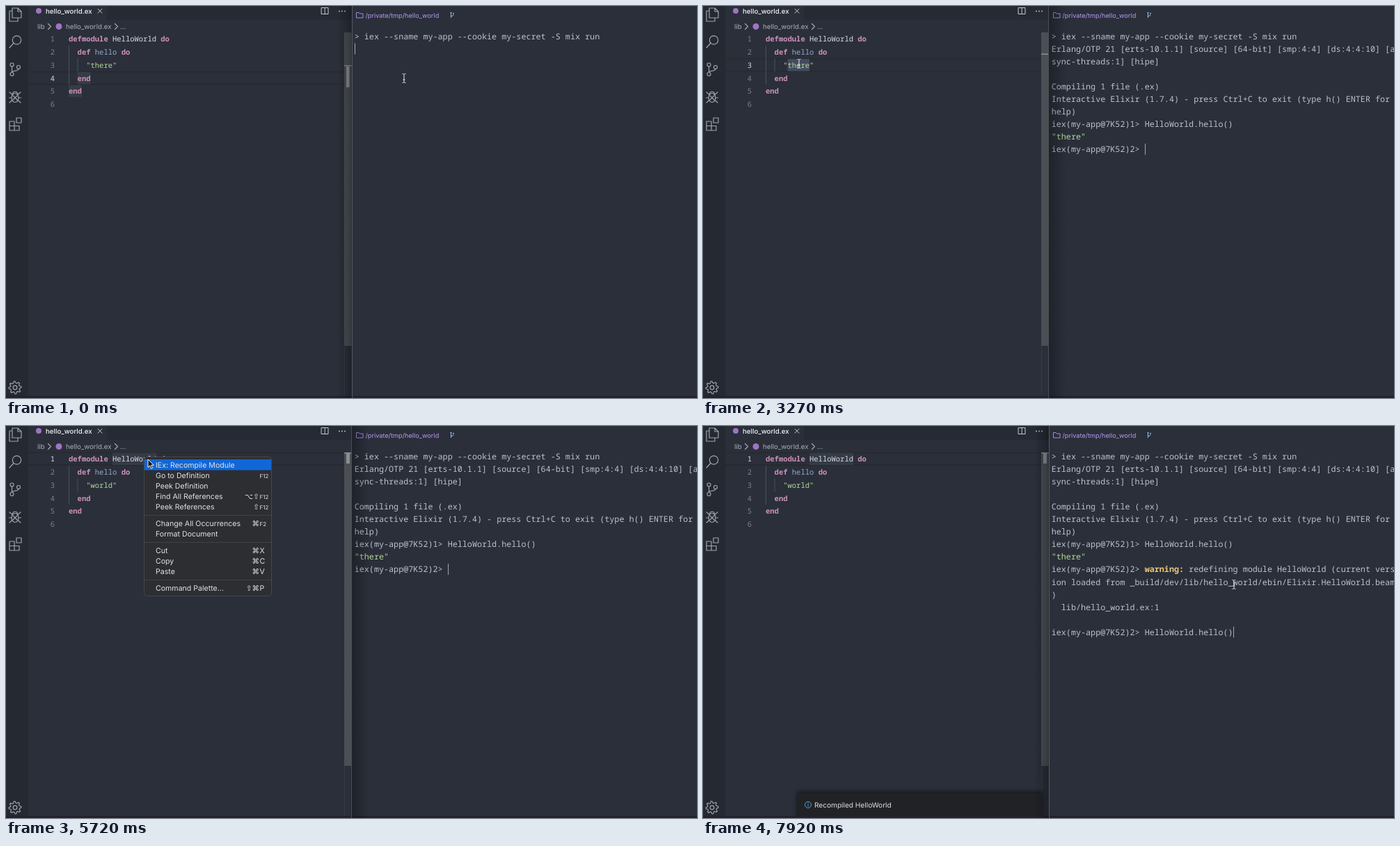
An HTML page that plays this animation: 993x564 px, repeating every 8000 ms.

```html
<!DOCTYPE html>
<html lang="en">
<head>
<meta charset="utf-8">
<title>Recompile module from the editor</title>
<style>
html, body { margin: 0; width: 100%; height: 100%; overflow: hidden; background: #2a2f3a; }
svg { display: block; width: 993px; height: 564px; }
text { white-space: pre; text-rendering: geometricPrecision; }
.ui { font-family: Inter, "Open Sans", sans-serif; }
.code, .term { font-family: "Noto Sans Mono", "DejaVu Sans Mono", monospace; }
.code { font-size: 10.5px; fill: #d8dee9; }
.term { font-size: 11.76px; fill: #bbc2cd; }
.key { fill: #cf92ba; font-weight: 700; }
.fn { fill: #94abc7; }
.str { fill: #b2d898; }
.warn { fill: #f0c674; font-weight: 700; }
.num { fill: #7a818d; text-anchor: end; }
.now { fill: #d8dce3; text-anchor: end; }
.dim { fill: #adadad; }
.side { fill: #b4c2cf; }
.icon { fill: none; stroke: #a0a5ae; stroke-width: 1.2; stroke-linejoin: round; stroke-linecap: round; }
.lite { stroke: #c5c9d0; stroke-width: 1; }
.item { font-size: 10.6px; fill: #e2e2e4; }
.small { font-size: 8px; }
.mod { font-family: "DejaVu Sans", sans-serif; font-size: 10.5px; fill: #e2e2e4; text-anchor: end; }
</style>
</head>
<body>
<svg viewBox="0 0 993 564">
  <defs>
    <linearGradient id="toLeft"><stop offset="0" stop-opacity="0"/><stop offset="1" stop-opacity=".28"/></linearGradient>
    <linearGradient id="toRight"><stop offset="0" stop-opacity=".28"/><stop offset="1" stop-opacity="0"/></linearGradient>
    <filter id="soft" x="-10%" y="-30%" width="120%" height="160%"><feGaussianBlur stdDeviation="3"/></filter>
  </defs>

  <rect width="993" height="564" fill="#2a2f3a"/>
  <rect width="32" height="564" fill="#252931"/>
  <rect x="145" width="352" height="20" fill="#252a33"/>

  <g class="icon">
    <path d="M9 3h8l5 5v9H9zM17 3v5h5M9 7H5v15h12v-5"/>
    <circle cx="15.5" cy="49" r="6.2"/><path d="M11 53.5 5 60"/>
    <circle cx="8.5" cy="84.5" r="2.5"/><circle cx="8.5" cy="98" r="2.5"/><circle cx="18" cy="88" r="2.5"/>
    <path d="M8.5 87v8.5M18 90.5c0 4-9.5 2-9.5 5"/>
    <ellipse cx="13" cy="132" rx="5" ry="6.5"/>
    <path d="M9.5 127c0-5 7-5 7 0M5 124l3.5 3M21 124l-3.5 3M4.5 132H8M18 132h3.5M5 139l3.5-3M21 139l-3.5-3M10 129l6 6M16 129l-6 6"/>
    <path d="M5 166h7v13H5zM5 172.5h14V179H5M15 161h7v7h-7z"/>
    <circle cx="13" cy="549" r="2.8"/>
    <path id="gear"/>
  </g>

  <g class="ui">
    <circle cx="47" cy="7" r="4" fill="#a074c4"/>
    <text x="57" y="10.6" font-size="9.7" font-weight="500" fill="#f4f6fa">hello_world.ex</text>
    <path class="icon lite" d="M132 4.2l6 6M138 4.2l-6 6" data-on="0-3960 4660-8000"/>
    <circle cx="135" cy="7.2" r="3.3" fill="#c5c9d0" data-on="3960-4660"/>
    <path class="icon lite" d="M453.5 2.500h9.500v9h-9.500zM458.2 2.500v9"/>
    <g fill="#c5c9d0"><circle cx="479" cy="7.5" r=".9"/><circle cx="483" cy="7.5" r=".9"/><circle cx="487" cy="7.5" r=".9"/></g>
    <g font-size="9.7" fill="#aab0ba">
      <text x="45" y="32.8">lib</text>
      <text x="86" y="32.8">hello_world.ex</text>
      <text x="164" y="32.8">...</text>
    </g>
    <path class="icon" d="M60.5 25.5l4 4-4 4M156.500 25.5l4 4-4 4"/>
    <circle cx="76" cy="29.5" r="4.5" fill="#a074c4"/>
  </g>

  <g id="editor"></g>
  <rect x="486" y="38" width="1" height="523" fill="#353a44"/>
  <rect x="486" y="38" width="10.5" height="451" fill="#4b4f54"/>
  <g fill="#8a8e94">
    <path d="M486 85h10.5v1.6H486zM489 87h4.5v30H489z" data-on="0-3160"/>
    <path d="M486 68.5h10.5v1.6H486z" data-on="3160-5140"/>
    <path d="M486 38h10.5v1.5H486z" data-on="5140-8000"/>
    <path d="M489 39h5v15h-5z" data-on="5370-8000"/>
  </g>

  <g data-on="3960-4080">
    <rect x="128.5" y="95.5" width="336.5" height="75.5" fill="#252526" stroke="#3c3e42"/>
    <rect x="128" y="95" width="337" height="17.5" fill="#073655"/>
    <path d="M133.5 100.5h5M140.5 100.5h4M133.5 104.5h3M138.5 104.5h6M133.5 108.5h6M141.5 108.5h2" stroke="#c8ccd2" stroke-width="1.5"/>
    <text class="code" x="147.5" y="107.8"><tspan fill="#2aa4ff" font-weight="700">w</tspan>ith(args)</text>
    <text class="code side" x="287" y="107.8">(Kernel.SpecialForms) macro</text>
    <text class="code dim" x="133" y="129.5">(Kernel.SpecialForms) macro</text>
    <path class="icon lite" d="M448.500 120l6 6M454.500 120l-6 6"/>
    <text class="ui" x="133" y="161.5" font-size="12" fill="#dcdcdc">Used to combine matching clauses.</text>
  </g>

  <g id="note" class="ui">
    <rect x="135" y="526" width="353" height="37" opacity=".5" filter="url(#soft)"/>
    <rect x="137" y="529" width="349" height="32" fill="#212225"/>
    <circle cx="151" cy="545" r="4.5" fill="none" stroke="#4ba3e8"/>
    <path d="M151 544.2v3.2M151 542.1v1" stroke="#4ba3e8" stroke-width="1.1"/>
    <text x="160" y="549" font-size="10.1" fill="#dededf">Recompiled HelloWorld</text>
  </g>

  <rect x="498" width="495" height="564" fill="#2a2f3a"/>
  <path d="M503.5 17V9.500h3.500l1.200 1.500h4.800v6z" fill="none" stroke="#a98ae0"/>
  <text class="ui" x="516.5" y="16.8" font-size="9.2" fill="#b898ee">/private/tmp/hello_world</text>
  <path d="M639.5 9v8M639.5 14.5c3 0 3.500-1 3.500-3M642 10.5h2M638.5 9.500h2" fill="none" stroke="#9fc4ef"/>
  <g id="term"></g>

  <rect y="561" width="993" height="3" fill="#25212b"/>
  <g data-on="0-2660 7170-8000">
    <rect x="476" width="21" height="564" fill="url(#toLeft)"/>
    <rect x="497" width="1" height="564" fill="#555a64"/>
  </g>
  <g data-on="2660-7170">
    <rect x="497" width="26" height="564" fill="url(#toRight)"/>
    <rect x="496" width="1" height="564" fill="#4a4f58"/>
  </g>

  <g id="menu" class="ui"></g>

  <g id="mouse">
    <path id="beam" d="M-2.500-6.500C-1-6.500 0-6 0-5C0-6 1-6.500 2.500-6.500M0-5V5M-2.500 6.500C-1 6.500 0 6 0 5C0 6 1 6.500 2.500 6.500M-1.500 2h3" fill="none" stroke="#e8e8ea"/>
    <path id="arrow" d="M0 0V11.500L2.700 9 4.600 13.400 6.600 12.500 4.700 8.300H8.300Z" fill="#14161a" stroke="#f4f4f4"/>
  </g>
</svg>

<script>
const LOOP = 8000;
const el = id => document.getElementById(id);
const on = (a, b) => a === undefined ? "" : ` data-on="${a}-${b ?? LOOP}"`;
const text = (x, y, cls, s, a, b) => `<text x="${x}" y="${y}" class="${cls}"${on(a, b)}>${s}</text>`;
const rect = (x, y, w, h, fill, a, b) =>
  `<rect x="${x}" y="${y}" width="${w}" height="${h}" fill="${fill}"${on(a, b)}/>`;
const span = (cls, s) => `<tspan class="${cls}">${s}</tspan>`;
const key = s => span("key", s);

// Settings cog
el("gear").setAttribute("d", Array.from({ length: 33 }, (_, i) => {
  const a = i * Math.PI / 16, r = (i + 1) % 4 < 2 ? 9 : 6.6;
  return `${i ? "L" : "M"}${13 + r * Math.cos(a)} ${549 + r * Math.sin(a)}`;
}).join(""));

// Editor
const CW = 6.3, rowY = n => 47.3 + 18.8 * (n - 1), colX = c => 90 + CW * c;
const activeLine = { 4: [0, 3160], 3: [3160, 5140], 1: [5140, LOOP] };
const typed = [["there", 0], ["w", 3960], ["wo", 4080], ["wor", 4200], ["worl", 4310], ["world", 4430]];
const code = (n, col, s, a, b) => text(colX(col), rowY(n) + 3.8, "code", s, a, b);
const wordBox = (n, col, len, fill, a, b) => rect(colX(col), rowY(n) - 8.7, len * CW, 17.4, fill, a, b);

let out = "";
for (let n = 1; n <= 6; n++) {
  const [a, b] = activeLine[n] ?? [0, 0];
  const number = (cls, from, to) => text(70, rowY(n) + 3.8, "code " + cls, n, from, to);
  out += rect(32, rowY(n) - 9.4, 454, 1.3, "#282828", a, b) + rect(32, rowY(n) + 8.2, 454, 1.3, "#282828", a, b);
  out += number("num", 0, a) + number("now", a, b) + number("num", b, LOOP);
}
out += wordBox(4, 2, 3, "#363c47", 0, 3160) + wordBox(5, 0, 3, "#363c47", 0, 3160);
out += wordBox(3, 5, 5, "#434c5e", 3270, 3960) + wordBox(1, 10, 10, "#353b46", 5370);
out += rect(90, rowY(2) - 9.4, 1, 56.4, "#4b515c") + rect(102.6, rowY(3) - 9.4, 1, 18.8, "#4b515c");
out += code(1, 0, `${key("defmodule")} HelloWorld ${key("do")}`);
out += code(2, 2, `${key("def")} ${span("fn", "hello")} ${key("do")}`);
out += code(4, 2, key("end")) + code(5, 0, key("end"));
typed.forEach(([s, a], i) => {
  const b = typed[i + 1]?.[1] ?? LOOP;
  out += code(3, 4, span("str", `"${s}"`), a, b);
  if (i) out += rect(colX(5 + s.length) - .5, rowY(3) - 9, 1.3, 18, "#d5dbe5", a, Math.min(b, 4900));
});
el("editor").innerHTML = out;

// Terminal
const TW = 7.056, lineY = r => 43.8 + 18.07 * r;
const prompt = n => `iex(my-app@7K52)${n}&gt; `;
const call = "HelloWorld.hello()";
const lines = [
  [0, 0, "&gt; iex --sname my-app --cookie my-secret -S mix run"],
  [1, 120, "Erlang/OTP 21 [erts-10.1.1] [source] [64-bit] [smp:4:4] [ds:4:4:10] [a"],
  [2, 120, "sync-threads:1] [hipe]"],
  [4, 570, "Compiling 1 file (.ex)"],
  [5, 570, "Interactive Elixir (1.7.4) - press Ctrl+C to exit (type h() ENTER for"],
  [6, 570, "help)"],
  [7, 570, prompt(1)],
  [7, 1230, " ".repeat(19) + call],
  [8, 1830, span("str", '"there"')],
  [9, 1830, prompt(2)],
  [9, 7170, " ".repeat(19) + span("warn", "warning:") + " redefining module HelloWorld (current vers"],
  [10, 7170, "ion loaded from _build/dev/lib/hello_world/ebin/Elixir.HelloWorld.beam"],
  [11, 7170, ")"],
  [12, 7170, "  lib/hello_world.ex:1"],
  [14, 7920, prompt(2) + call]
];
const carets = [
  [0, 1, 0, 120], [0, 4, 120, 570], [19, 7, 570, 1230], [37, 7, 1230, 1830],
  [19, 9, 1830, 2430], [19, 9, 2810, 7170], [0, 14, 7170, 7440], [37, 14, 7920, LOOP]
];
el("term").innerHTML =
  lines.map(([r, a, s]) => text(500.7, lineY(r) + 4, "term", s, a)).join("") +
  carets.map(([c, r, a, b]) => rect(501 + TW * c, lineY(r) - 8.3, 1, 16, "#a4aab4", a, b)).join("");

// Context menu
const items = [
  [56, "IEx: Recompile Module"],
  [71, "Go to Definition", "", "F12"],
  [86, "Peek Definition"],
  [101, "Find All References", "⌥⇧", "F12"],
  [116, "Peek References", "⇧", "F12"],
  [140, "Change All Occurrences", "⌘", "F2"],
  [155, "Format Document"],
  [179, "Cut", "⌘", "X"],
  [194, "Copy", "⌘", "C"],
  [209, "Paste", "⌘", "V"],
  [233, "Command Palette...", "⇧⌘", "P"]
];
const hover = (a, b) => rect(199, 48, 182, 15.5, "#1267d6", a, b);
el("menu").innerHTML =
  '<rect x="198.5" y="44.5" width="183" height="200" rx="4" fill="#2d2e32" stroke="#45474c"/>' +
  hover(5720, 6320) + hover(6440, 6550) +
  [128, 167, 221].map(y => rect(199, y, 182, 1, "#404247")).join("") +
  items.map(([y, s, mod = "", k = ""]) =>
    text(215, y + 3.8, "item", s) +
    text(364, y + 3.8, "mod", mod) +
    text(364.5, y + 3.8, k[1] ? "item small" : "item", k)).join("");

// Stepped tracks: [time, ...values]
const menuFade = [[0, 0], [5370, 1], [6440, .13], [6550, 0]];
const noteDrop = [[0, 40], [7320, 26], [7440, 10], [7560, 2], [7680, 0]];
const mouse = [
  [0, 572, 104], [570, 572, 105], [2310, 520, 102], [2430, 320, 94], [2550, 176, 88, 1],
  [2660, 177, 92], [2810, 160, 88], [2930, 146, 85], [3040, 138, 83],
  [4780, 158, 72], [4900, 186, 55], [5020, 196, 50], [5370, 197, 45, 1],
  [5720, 204, 48, 1], [5840, 214, 49, 1], [5960, 222, 49, 1], [6440, 222, 51],
  [6910, 470, 140], [7020, 764, 225, 1], [7170, 763, 228]
];
const at = (track, t) => track.findLast(k => k[0] <= t);
const timed = [...document.querySelectorAll("[data-on]")].map(node => ({
  node, spans: node.dataset.on.split(" ").map(s => s.split("-").map(Number))
}));

function draw(t) {
  for (const { node, spans } of timed)
    node.style.display = spans.some(([a, b]) => t >= a && t < b) ? "" : "none";
  const [, x, y, arrow] = at(mouse, t);
  el("mouse").setAttribute("transform", `translate(${x} ${y})`);
  el("arrow").style.display = arrow ? "" : "none";
  el("beam").style.display = arrow ? "none" : "";
  el("menu").style.opacity = at(menuFade, t)[1];
  el("note").style.display = t < 7320 ? "none" : "";
  el("note").setAttribute("transform", `translate(0 ${at(noteDrop, t)[1]})`);
}

const start = performance.now();
function tick() {
  draw((performance.now() - start) % LOOP);
  requestAnimationFrame(tick);
}
tick();
</script>
</body>
</html>
```
